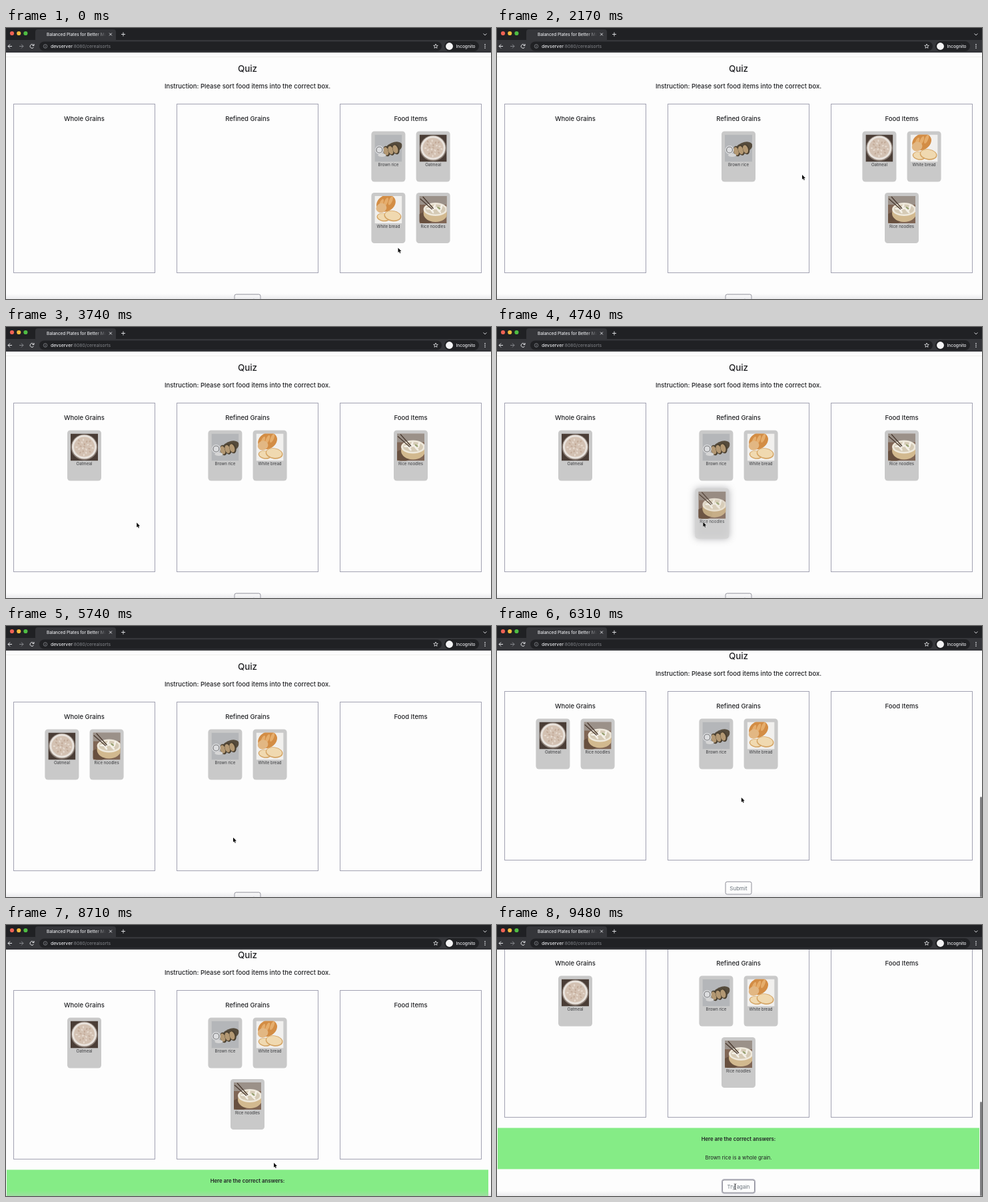
Recreate the animation shown at these times as an HTML page with a canvas. Size 728 px wide and 408 px high, loop 9510 ms.

```html
<!DOCTYPE html>
<html lang="en">
<head>
<meta charset="utf-8">
<title>Sorting quiz</title>
<style>
html, body { margin: 0; width: 100%; height: 100%; overflow: hidden; background: #fdfdfd; }
canvas { display: block; width: 728px; height: 408px; }
</style>
</head>
<body>
<canvas id="stage"></canvas>
<script>
const W = 728, H = 408, LOOP = 9510, SUBMIT_AT = 7900, RELEASE = 80;
const INK = '#202124', PAGE = '#fdfdfd', CARD = '#c9c9c9', EDGE = '#a2a2b2';
const BAR = '#35363a', TABS = '#202124', LIGHT = '#e6e7ea', DIM = '#85878c';
const canvas = document.getElementById('stage');
const c = canvas.getContext('2d');
const scale = window.devicePixelRatio || 1;
canvas.width = W * scale;
canvas.height = H * scale;

const zones = ['Whole Grains', 'Refined Grains', 'Food Items']
  .map((name, i) => ({ name, x: 11.5 + 245 * i, cx: 117.5 + 245 * i }));
const foods = {
  rice: { label: 'Brown rice', draw: drawRice },
  oats: { label: 'Oatmeal', draw: drawOats },
  bread: { label: 'White bread', draw: drawBread },
  noodles: { label: 'Rice noodles', draw: drawNoodles }
};

// The pointer glides through these steps and rests between them.
// A grab ends on the card, at "hold" from its corner; a drop carries it to a zone.
const script = [
  { from: 240, to: 520, grab: 'rice', hold: [30, 46] },
  { from: 570, to: 1130, drop: 1, x: 352, y: 212 },
  { from: 1600, to: 2170, x: 458, y: 221 },
  { from: 2170, to: 2330, grab: 'bread', hold: [24, 36] },
  { from: 2340, to: 2450, drop: 1, x: 395, y: 200 },
  { from: 2570, to: 2900, grab: 'oats', hold: [-3, 79.5] },
  { from: 2950, to: 3450, drop: 0, x: 95, y: 317, copy: true },
  { from: 3550, to: 4210, grab: 'noodles', hold: [12, 51] },
  { from: 4480, to: 4940, drop: 0, x: 120, y: 206, bow: 92 },
  { from: 5040, to: 5310, x: 110, y: 167 },
  { from: 5440, to: 5740, x: 341, y: 318.5 },
  { from: 5880, to: 6810, x: 399, y: 183 },
  { from: 6830, to: 6840, grab: 'noodles', hold: [38, 57] },
  { from: 7000, to: 7433, drop: 1, x: 373, y: 286 },
  { from: 7520, to: 7640, x: 364, y: 391 },
  { from: 8250, to: 8710, x: 402, y: 358 },
  { from: 8950, to: 9400, x: 357.5, y: 394 }
];

function ease(t, from, to) {
  const u = Math.min(1, Math.max(0, (t - from) / (to - from)));
  return u * u * (3 - 2 * u);
}
const scrollAt = t => 16 * ease(t, 5880, 6200) + 63 * ease(t, 8950, 9400);

// Cards stand two to a row, each row centred in its zone
function slot(z, count, i) {
  const row = i >> 1, inRow = Math.min(2, count - row * 2);
  return { x: zones[z].cx - 25.5 + (i % 2 - (inRow - 1) / 2) * 67.2, y: 155.5 + row * 92.5 };
}

const home = { x: 588.5, y: 331 };
const firstShelves = [[], [], Object.keys(foods)];
firstShelves[2] = ['rice', 'oats', 'bread', 'noodles'];

function plan() {
  let spot = home, shelves = firstShelves, held;
  for (const s of script) {
    if (s.grab) {
      const z = shelves.findIndex(list => list.includes(s.grab));
      const place = slot(z, shelves[z].length, shelves[z].indexOf(s.grab));
      s.x = place.x + s.hold[0];
      s.y = place.y + s.hold[1] - scrollAt(s.to);
      held = s;
    }
    if (s.drop !== undefined) {
      s.held = held;
      shelves = shelves.map(list => list.filter(id => id !== held.grab));
      shelves[s.drop].push(held.grab);
    }
    s.start = spot;
    s.shelves = shelves;
    spot = s;
  }
}

function pose(t) {
  const step = script.findLast(s => t >= s.from);
  if (!step) return { ...home, shelves: firstShelves };
  const e = ease(t, step.from, step.to), { start } = step;
  const dropped = script.findLast(s => s.held && t >= s.to + RELEASE);
  return {
    x: start.x + (step.x - start.x) * e,
    y: start.y + (step.y - start.y) * e + (step.bow || 0) * Math.sin(Math.PI * e),
    shelves: dropped ? dropped.shelves : firstShelves,
    held: t < step.to + RELEASE ? step.held : null,
    badge: step.copy || t >= step.to
  };
}

function text(s, x, y, size, weight = 400, color = INK, align = 'center') {
  c.font = `${weight} ${size}px Inter, Roboto, sans-serif`;
  c.textAlign = align;
  c.fillStyle = color;
  c.fillText(s, x, y + size * 0.36);
}
function rect(x, y, w, h, fill) {
  c.fillStyle = fill;
  c.fillRect(x, y, w, h);
}
function pill(x, y, w, h, r, fill) {
  c.beginPath();
  c.roundRect(x, y, w, h, r);
  c.fillStyle = fill;
  c.fill();
}
function oval(x, y, rx, ry, fill, turn = 0) {
  c.beginPath();
  c.ellipse(x, y, rx, ry, turn, 0, Math.PI * 2);
  c.fillStyle = fill;
  c.fill();
}
function stroke(color, width) {
  c.strokeStyle = color;
  c.lineWidth = width;
  c.stroke();
}
function arc(x, y, r, color, width, from = 0, to = Math.PI * 2) {
  c.beginPath();
  c.arc(x, y, r, from, to);
  stroke(color, width);
}
function path(points, color, width, close) {
  c.beginPath();
  points.forEach(([x, y]) => c.lineTo(x, y));
  if (close) c.closePath();
  stroke(color, width);
}
function cross(x, y, r, color, width, turn = 0) {
  for (const a of [turn, turn + Math.PI / 2]) {
    const dx = r * Math.cos(a), dy = r * Math.sin(a);
    path([[x - dx, y - dy], [x + dx, y + dy]], color, width);
  }
}

// Pictures, each 41 by 41
function drawRice() {
  rect(0, 0, 41, 41, '#b4b6b9');
  oval(28, 20, 14, 8, '#554b3c', -0.4);
  for (let i = 0; i < 3; i++) {
    oval(18 + i * 7, 25 - i * 1.5, 5, 8, '#4b4030', -0.3);
    oval(17 + i * 7, 25 - i * 1.5, 3.8, 6.3, '#b39873', -0.3);
  }
  oval(7, 23, 6.5, 6.5, '#dcdddf');
  arc(7, 23, 4.5, '#77787a', 1.2);
  oval(11, 31, 6, 2.5, '#d6d6d6');
}
function drawOats() {
  rect(0, 0, 41, 41, '#4a3d36');
  oval(20.5, 20.5, 20, 19.5, '#887b72');
  oval(20.5, 20, 18.5, 18, '#e8e2dc');
  oval(20.5, 20, 15.5, 15, '#d3c1b2');
  for (let i = 0; i < 22; i++) {
    const a = i * 2.4, r = 2.8 * Math.sqrt(i);
    oval(20.5 + r * Math.cos(a), 20 + r * Math.sin(a), 1.7, 1.1, i % 2 ? '#e6dacf' : '#c2aa98', a);
  }
}
function drawBread() {
  rect(0, 0, 41, 41, '#f1f0ee');
  oval(17, 11, 15, 12, '#d38d45', -0.5);
  for (let i = 0; i < 3; i++) oval(10 + i * 7, 11 - i * 2, 2.5, 7, '#e5ad6c', 0.4);
  oval(10, 18, 8, 7, '#e2b783', -0.4);
  for (const [x, y, r] of [[13, 32, 10], [27, 30, 13]]) {
    oval(x, y, r, r * 0.62, '#d4a362', 0.15);
    oval(x, y - 0.5, r - 1.3, r * 0.52, '#f0d9b0', 0.15);
  }
}
function drawNoodles() {
  rect(0, 0, 41, 41, '#806655');
  rect(0, 0, 41, 13, '#9b9189');
  oval(9, 33, 12, 9, '#68503f');
  oval(24, 26, 18, 13, '#d2b98f');
  oval(24, 20, 18, 10, '#efe9dc');
  oval(24, 20, 15, 7.5, '#d5cab5');
  for (let i = 0; i < 6; i++) oval(15 + i * 3.5, 19 + Math.sin(i * 2) * 3, 5, 1.6, '#f4f0e7', i);
  oval(29, 18, 3, 1.3, '#96a070', 0.6);
  for (let i = 0; i < 2; i++) path([[1 + i * 4, 4 - i * 3], [19 + i * 2, 20 - i]], '#4a3a30', 1.3);
}

function card(id, x, y, ghost) {
  const food = foods[id];
  c.save();
  c.translate(x, y);
  if (ghost) {
    c.globalAlpha = 0.85;
    c.shadowColor = 'rgba(110,110,115,.6)';
    c.shadowBlur = 11 * scale;
  }
  pill(0, 0, 51, 76, 4.5, ghost ? '#d3d3d3' : CARD);
  c.shadowColor = 'transparent';
  text(food.label, 25.5, 50.5, 6.1, 400, '#37383b');
  c.translate(5, 5);
  c.beginPath();
  c.rect(0, 0, 41, 41);
  c.clip();
  food.draw();
  c.restore();
}

function button(label, y, w, size, focus) {
  const x = 362.5 - w / 2;
  if (focus) {
    c.beginPath();
    c.roundRect(x, y, w, 19, 2.5);
    stroke('#bcbcc6', 3.5);
  }
  pill(x, y, w, 19, 2.5, PAGE);
  stroke('#7f7f8c', 0.9);
  text(label, 362.5, y + 9.8, size, 400, '#6c757d');
}

function page(t, shelves) {
  const scroll = scrollAt(t), done = t >= SUBMIT_AT;
  rect(0, 0, W, H, PAGE);
  c.save();
  c.translate(0, -scroll);
  rect(0, 43, W, 1, '#efefec');
  text('Quiz', 362.5, 61.3, 13.4, 500);
  text('Instruction: Please sort food items into the correct box.', 362.5, 88, 9.5, 500);
  zones.forEach((zone, z) => {
    c.strokeStyle = EDGE;
    c.lineWidth = 1;
    c.strokeRect(zone.x, 114.5, 212, 254);
    text(zone.name, zone.cx, 137, 9.5, 500);
    shelves[z].forEach((id, i) => {
      const place = slot(z, shelves[z].length, i);
      card(id, place.x, place.y);
    });
  });
  if (done) {
    rect(1, 384.5, 723, 62, '#85ec86');
    text('Here are the correct answers:', 362.5, 401.5, 7.8, 600);
    text('Brown rice is a whole grain.', 362.5, 429, 7.7);
    button('Try again', 463, 48, 7.7, true);
  } else {
    button('Submit', 401, 39, 8);
  }
  c.restore();

  const haze = c.createLinearGradient(0, 400, 0, H);
  haze.addColorStop(0, 'rgba(200,200,208,0)');
  haze.addColorStop(1, 'rgba(200,200,208,.35)');
  rect(0, 400, W, 8, haze);
  if ((t > 5880 && t < 6700) || t > 8950) {
    const length = done ? 142 : 151, left = (done ? 79 : 16) - scroll;
    pill(725, H - length - left * 0.4, 3, length, 1.5, '#7e7e80');
  }
}

function browser() {
  rect(0, 0, W, 18, TABS);
  rect(0, 18, W, 19, BAR);
  pill(44, 2, 121, 20, 4, BAR);
  ['#ee6254', '#f0bb3d', '#4fbd43'].forEach((color, i) => oval(9 + i * 10.2, 8, 3.1, 3.1, color));
  const fade = c.createLinearGradient(134, 0, 150, 0);
  fade.addColorStop(0, LIGHT);
  fade.addColorStop(1, BAR);
  c.save();
  c.beginPath();
  c.rect(58, 2, 92, 15);
  c.clip();
  text('Balanced Plates for Better Mornings', 61, 9.5, 6.4, 500, fade, 'left');
  c.restore();
  cross(157, 9.5, 2.7, LIGHT, 0.9, Math.PI / 4);
  cross(176, 9.5, 3, LIGHT, 0.9);
  path([[716.5, 8.5], [719, 10.8], [721.5, 8.5]], LIGHT, 0.9);

  // Back, forward, reload
  [[6, -1, LIGHT], [23, 1, DIM]].forEach(([x, d, color]) => {
    path([[x - 3 * d, 27.5], [x + 3 * d, 27.5]], color, 1);
    path([[x, 24.5], [x + 3 * d, 27.5], [x, 30.5]], color, 1);
  });
  arc(39, 27.5, 2.9, LIGHT, 1, 0.5, 5.6);
  path([[42, 24], [42, 26.5], [39.5, 26.5]], LIGHT, 1);

  pill(50, 20.5, 604, 14, 7, TABS);
  arc(59, 27.5, 2.8, DIM, 0.8);
  path([[59, 27], [59, 29.3]], DIM, 0.8);
  rect(58.6, 25.6, 0.8, 0.8, DIM);
  text('devserver', 67, 27.5, 6.8, 500, LIGHT, 'left');
  const end = 67 + c.measureText('devserver').width;
  text(':8080/cerealsorts', end, 27.5, 6.8, 400, DIM, 'left');
  const star = Array.from({ length: 10 }, (_, i) => {
    const a = i * Math.PI / 5 - Math.PI / 2, r = i % 2 ? 1.5 : 3.5;
    return [645 + r * Math.cos(a), 27.5 + r * Math.sin(a)];
  });
  path(star, LIGHT, 0.8, true);
  pill(658, 20, 52, 15, 7.5, TABS);
  oval(665.5, 27.5, 5.4, 5.4, '#f4f4f5');
  text('Incognito', 675.5, 27.5, 6.5, 500, LIGHT, 'left');
  for (let i = -1; i < 2; i++) oval(719, 27.5 + i * 2.6, 0.8, 0.8, LIGHT);
}

function arrow(x, y) {
  c.save();
  c.translate(x, y);
  path([[0, 0], [0, 7], [1.6, 5.6], [2.7, 8.2], [3.8, 7.7], [2.7, 5.2], [4.9, 5.1]], '#fff', 1, true);
  c.fillStyle = '#080808';
  c.fill();
  c.restore();
}
function beam(x, y) {
  path([[x, y - 4], [x, y + 4]], INK, 0.9);
  for (const d of [-1, 1]) path([[x - 1.7, y + 4.4 * d], [x, y + 3.6 * d], [x + 1.7, y + 4.4 * d]], INK, 0.8);
}
function plus(x, y) {
  oval(x, y, 5, 5, '#e6f3e2');
  oval(x, y, 4.5, 4.5, '#2f9d2a');
  cross(x, y, 2.5, '#fff', 1.2);
}

function draw(t) {
  c.setTransform(scale, 0, 0, scale, 0, 0);
  const { x, y, shelves, held, badge } = pose(t);
  page(t, shelves);
  browser();
  if (held) card(held.grab, x - held.hold[0], y - held.hold[1], true);
  if (t > 9370) beam(x, y);
  else arrow(x, y);
  if (held && badge) plus(x + 4.5, y + 11);
}

plan();
const start = performance.now();
function tick() {
  draw((performance.now() - start) % LOOP);
  requestAnimationFrame(tick);
}
tick();
</script>
</body>
</html>
```
